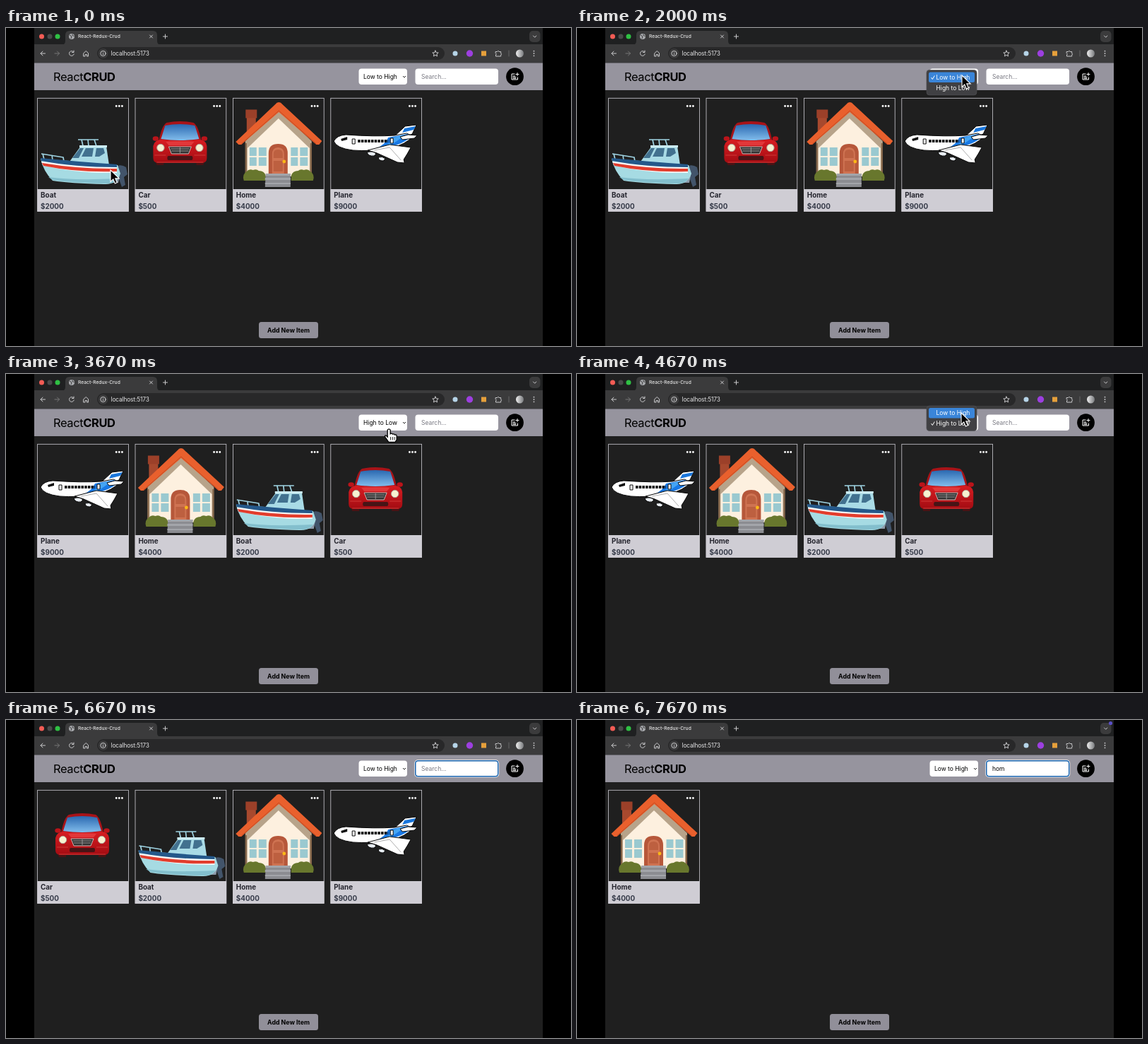
An HTML page that plays this animation: 800 px wide and 450 px high, repeating every 8000 ms.

```html
<!DOCTYPE html>
<html lang="en">
<head>
<meta charset="utf-8">
<title>Item list</title>
<style>
html, body { margin: 0; width: 100%; height: 100%; overflow: hidden; background: #000; }
svg { display: block; width: 800px; height: 450px; font-family: Inter, Roboto, sans-serif; }
.line { fill: none; stroke: #c9c9cb; stroke-width: 1; stroke-linecap: round; stroke-linejoin: round; }
.ui { font-size: 8.5px; }
.bold { font-size: 9.9px; font-weight: 700; }
</style>
</head>
<body>
<svg viewBox="0 0 800 450">
  <defs>
    <linearGradient id="glass" x2="0" y2="1"><stop stop-color="#2a68b0"/><stop offset="1" stop-color="#82bdec"/></linearGradient>
    <linearGradient id="paint" x2="0" y2="1"><stop stop-color="#d81d22"/><stop offset="1" stop-color="#a30c12"/></linearGradient>
    <linearGradient id="face"><stop stop-color="#f0f0f0"/><stop offset="1" stop-color="#77797c"/></linearGradient>

    <g id="Boat">
      <path d="M155 196q8-4 15 1l2 10-5 4 2 11-5 3-5-14-4-4z" fill="#42546a"/>
      <path d="M155 208h6l-2 11h-8z" fill="#8c9bab"/>
      <g fill="none" stroke="#9fd3e2" stroke-width="1.7" stroke-linejoin="round">
        <path d="M50 178l31 5 1 6M52 178l2 8M65 180l1 7M102 158h29M107 158l2 9M125 158l3 9M116 158l1 9"/>
      </g>
      <path d="M90 189l16-22h36l4 27z" fill="#a9dbe6"/>
      <path d="M104 166h39v3h-39z" fill="#cbeaf0"/>
      <path d="M94 184l11-14h5l-7 14zM107 182l6-12h11l-2 12zM126 182l2-12h10l2 7-8 5z" fill="#42718f"/>
      <path d="M49 185q40 3 69 5l40 4 4 12q-5 16-23 15-48-1-73-5-13-13-17-31z" fill="#a6dbe3"/>
      <path d="M50 189l107 8v8q-60 1-105-11z" fill="#f5f7f7"/>
      <path d="M49 184q50 5 108 9v4q-60 0-107-9z" fill="#24588a"/>
      <path d="M51 191q55 9 106 8v4q-55 2-104-8z" fill="#e23d2d"/>
      <path d="M60 211q35 5 98 2-5 8-18 7-48-1-74-5z" fill="#83bfcd"/>
    </g>

    <g id="Car">
      <path d="M72 184h13v10H75zM131 184h13l-3 10h-10z" fill="#4b1214"/>
      <ellipse cx="73.500" cy="156.500" rx="4.200" ry="3.200" fill="#bb141a"/>
      <ellipse cx="142.500" cy="156.500" rx="4.200" ry="3.200" fill="#bb141a"/>
      <path d="M78 160q4-22 11-26 19-4 38 0 7 4 11 26z" fill="#a81318"/>
      <path d="M81 157l6-19q21-4 42 0l6 19q-27 4-54 0z" fill="url(#glass)"/>
      <path d="M70 167q2-9 12-9 26 3 52 0 11 0 12 9v17q0 7-7 7H77q-7 0-7-7z" fill="url(#paint)"/>
      <path d="M88 161q20-2 40 0l-4 5H92z" fill="#e2383a"/>
      <g fill="#f7f1d0" stroke="#a9a49a"><circle cx="80.500" cy="169.500" r="5.200"/><circle cx="135.500" cy="169.500" r="5.200"/></g>
      <path d="M92 168h32l-4 10H96z" fill="#333" stroke="#c7b9b5"/>
      <path d="M95 171h26M96 174h24M108 169v8" stroke="#aaa" stroke-width=".8"/>
      <rect x="90" y="181" width="36" height="6" rx="2" fill="#471416"/>
      <path d="M72 180h16M128 180h16M75 190h66" stroke="#d5453f" stroke-width=".8"/>
    </g>

    <g id="Home">
      <path d="M64 125h13v30H64z" fill="#a8492e"/><path d="M62.500 115.500h16v12h-16z" fill="#9c4029"/>
      <path d="M62 160l47-44 47 44v50H62z" fill="#b7a38a"/>
      <path d="M65 170l44-42 44 42v40H65z" fill="#fdf0df"/>
      <path d="M62 163h2v46h-2zM154 163h2v46h-2z" fill="#826144"/>
      <path d="M109.500 105q3 0 5 3l56 52-4 5h-4l-53-46-53 46h-4l-4-4 56-53q2-3 5-3z" fill="#e9602d"/>
      <path d="M56.500 164l53-47 53 47" fill="none" stroke="#c44a22"/>
      <g fill="#9ac9d0">
        <path id="panes" d="M68 169h10v12H68zM81 169h11v12H81zM68 183h10v12H68zM81 183h11v12H81z"/>
        <use href="#panes" x="58.500"/>
      </g>
      <path d="M95 207v-30q0-13 13.500-13t13.500 13v30z" fill="#b6573a"/>
      <path d="M100 207v-28q0-10 8.500-10t8.500 10v28z" fill="#cf7352"/>
      <path d="M102 184v-6q0-6 6.500-6t6.500 6v6zM102 188h13v15h-13z" fill="#bd6040"/>
      <circle cx="117" cy="189" r="2.400" fill="#fbb817"/>
      <path id="bush" d="M60 216q-3-9 4-13 3-4 9-2 5-2 8 1 8 0 10 7v7z" fill="#68772d"/>
      <use href="#bush" transform="matrix(-1 0 0 1 218 0)"/>
      <path d="M91 206h35v19H90z" fill="#8b8c91"/>
      <path d="M91 206h35v3H91zM90 212h36v3H90zM90 219h36v2H90z" fill="#a3a5aa"/>
    </g>

    <g id="Plane" stroke="#080808" stroke-linejoin="round">
      <path d="M136 152l14-13 16-2-6 13-10 4z" fill="#fff"/>
      <path d="M149 142l16-3-3 5-16 4z" fill="#1976dc" stroke="none"/>
      <path d="M49 160q4-8 17-9 42 3 69 1l17-3 9 4q-10 12-32 17-28 5-53 3-24-3-27-13z" fill="#fff"/>
      <path d="M108 171q14-6 18-16l27-5 6 3q-14 15-51 18z" fill="#1979e5" stroke="none"/>
      <path d="M118 169q11-5 15-14l15-4q-9 12-30 18z" fill="#45a5f4" stroke="none"/>
      <path d="M143 154l11-3 13 1-4 4-17 2z" fill="#fff"/>
      <path d="M97 173l31-8 30 4-5 9-5 8 1 5-10-1-29-13z" fill="#fff"/>
      <path d="M106 173l22-4 16 18" fill="none" stroke="#999" stroke-width=".8"/>
      <path d="M96 176q8-3 13 2l-3 3q-8 1-10-5zM112 183q6-2 10 2l-3 3q-7 0-7-5z" fill="#e8edf2"/>
      <path d="M59 157l9-3v4l-8 2z" fill="#111" stroke="none"/>
      <path d="M75 157h4v7h-4zM129 156h4v7h-4z" fill="#fff"/>
      <path d="M83 160h43" stroke="#111" stroke-width="4" stroke-dasharray="3.5 1.2"/>
    </g>
  </defs>

  <rect x="40" width="720" height="450" fill="#1f1f1f"/>
  <rect x="40" width="720" height="24" fill="#1f2021"/>
  <rect x="40" y="23" width="720" height="27" fill="#3b3b3c"/>
  <path d="M78 24q6 0 6-6V10q0-6 6-6h118q6 0 6 6v8q0 6 6 6z" fill="#3b3b3c"/>
  <circle cx="50.500" cy="12" r="3.500" fill="#f45c55"/>
  <circle cx="62" cy="12" r="3.500" fill="#4a4a4b"/>
  <circle cx="73" cy="12" r="3.500" fill="#2fc044"/>
  <circle cx="93" cy="12" r="4" fill="#a9abae"/>
  <path d="M90 10l3 2-1 3M94 8.500v2l2.500 1" fill="none" stroke="#3b3b3c"/>
  <text x="102" y="14.400" font-size="6.700" font-weight="500" fill="#e6e6e6">React-Redux-Crud</text>
  <rect x="741" y="4" width="15.500" height="16" rx="5" fill="#3b3b3c"/>
  <rect x="129" y="27" width="492" height="18" rx="9" fill="#282829"/>
  <circle cx="137.500" cy="36" r="7" fill="#3b3b3c"/>
  <g class="line">
    <path d="M203.500 10l4 4m0-4l-4 4M222.500 12h6m-3-3v6M746.500 11l2.200 2.200 2.200-2.200"/>
    <path d="M55.500 36h-6.500m3-3l-3 3 3 3"/>
    <path d="M69 36h6.500m-3-3l3 3-3 3" stroke="#777"/>
    <path d="M95.700 34a3.400 3.400 0 1 0 .5 3M96 32v2.500h-2.500M110 35.500l3.300-3 3.200 3V40h-2v-2.500h-2.400V40h-2.100z"/>
    <circle cx="137.500" cy="36" r="3.600"/><path d="M137.500 36v1.700m0-3.500v.1"/>
    <path d="M608 32l1.200 2.700 3 .3-2.300 2 .7 2.900-2.600-1.500-2.600 1.500.7-2.900-2.300-2 3-.3z"/>
    <path d="M693.500 33.500h2.300q1-2.500 2.400 0h2.500v2.400q2 1 0 2.200V40h-7.200v-2q2-1 0-2.200z"/>
    <path d="M712 32v8" stroke="#666"/>
  </g>
  <text x="148.500" y="39" font-size="8.400" letter-spacing="-.15" fill="#e4e4e5">localhost:5173</text>
  <circle cx="636" cy="36" r="3.500" fill="#b6d4e8"/>
  <circle cx="656.500" cy="36" r="4.700" fill="#9d3fe0"/>
  <rect x="673" y="32.500" width="7" height="7" fill="#e6a03b"/>
  <circle cx="727.500" cy="36" r="5.500" fill="url(#face)"/>
  <g fill="#c9c9cb"><circle cx="747.500" cy="32.700" r=".9"/><circle cx="747.500" cy="36" r=".9"/><circle cx="747.500" cy="39.300" r=".9"/></g>

  <rect x="40" y="49.500" width="720" height="38.500" fill="#96949e"/>
  <text x="67" y="75" font-size="16.500" letter-spacing="-.41">React<tspan font-weight="700">CRUD</tspan></text>
  <circle cx="720.500" cy="68.700" r="12.400"/>
  <path class="line" style="stroke:#fff" d="M720 65h-4v8h8.500v-3M718 68h2.500M718 69.700h4M718 71.400h4M724 63.500v4m-2-2h4"/>
  <rect x="358" y="416" width="84" height="23" rx="3.500" fill="#918f99"/>
  <text x="400" y="431" text-anchor="middle" font-size="8.800" font-weight="700">Add New Item</text>
  <g id="live"></g>
</svg>
<script>
const LOOP = 8000, STEP = 1000 / 6;
const LOW = 'Low to High', HIGH = 'High to Low';
const price = { Boat: 2000, Car: 500, Home: 4000, Plane: 9000 };
const live = document.getElementById('live');

// time, x, y of the pointer tip
const path = [
  [0, 148, 201], [1167, 545, 67], [2167, 545, 67], [2500, 541, 83], [3333, 541, 83], [4167, 545, 69],
  [4333, 545, 69], [4667, 544, 55], [5000, 544, 55], [5333, 563, 64], [5833, 640, 68], [LOOP, 640, 68]
];

const text = (x, y, s, cls, fill) => `<text x="${x}" y="${y}" class="${cls}" fill="${fill}">${s}</text>`;
const box = (x, y, w, h, r, attrs) => `<rect x="${x}" y="${y}" width="${w}" height="${h}" rx="${r}" ${attrs}/>`;

function pointerAt(t) {
  const i = path.findIndex(k => k[0] > t);
  const [t0, x0, y0] = path[i - 1], [t1, x1, y1] = path[i];
  const u = (t - t0) / (t1 - t0), e = u * u * (3 - 2 * u);
  return [x0 + (x1 - x0) * e, y0 + (y1 - y0) * e];
}

function itemsAt(t) {
  if (t >= 6830) return ['Home'];
  if (t >= 5160) return ['Car', 'Boat', 'Home', 'Plane'];
  if (t >= 3330) return ['Plane', 'Home', 'Boat', 'Car'];
  return ['Boat', 'Car', 'Home', 'Plane'];
}

const card = (name, i) => `<g transform="translate(${i * 138.4})">
  <use href="#${name}"/>
  ${box(44.3, 228, 129.4, 31.8, 0, 'fill="#cfcdd4"')}
  ${box(44.6, 99.3, 128.8, 160.2, 0, 'fill="none" stroke="#cfcdd4" stroke-width=".8"')}
  ${[156.2, 160.3, 164.4].map(x => `<circle cx="${x}" cy="110.500" r="1.400" fill="#fff"/>`).join('')}
  ${text(49, 240, name, 'bold', '#25252e')}${text(49, 256, '$' + price[name], 'bold', '#353a48')}</g>`;

const field = (x, w, focus, fill = '#fff') => (focus
  ? box(x - 1.2, 56.3, w + 2.4, 24.9, 5, 'fill="#fff"') + box(x - .5, 57, w + 1, 23.5, 4.5, 'fill="#1762ad"') +
    box(x + 1, 58.5, w - 2, 20.5, 3, 'fill="#fff"')
  : box(x, 57.5, w, 22.5, 4, `fill="${fill}"`));

function select(t, fading) {
  const label = t >= 3330 && t < 5160 ? HIGH : LOW;
  return field(499.5, 68.5, t >= 5160 && t < 6330, fading ? '#d6d6d8' : '#fff') +
    (fading ? box(500.5, 58.5, 66.5, 20.5, 4, 'fill="none" stroke="#bbb" stroke-width="2"') : '') +
    text(506, 72, label, 'ui', '#000') +
    '<path d="M562 68l2 2 2-2" fill="none" stroke="#222"/>';
}

// The checked row always lies over the select box.
function menu(checked, hover, opacity) {
  const top = 59.5 - checked * 14.6;
  return `<g opacity="${opacity}" transform="translate(0 ${top})">
    ${box(494.5, -.5, 72, 36.5, 4.5, 'fill="#000" opacity=".25"')}
    ${box(495, 0, 71, 35.5, 4, 'fill="#404043" stroke="#5b5b5e" stroke-width=".5"')}
    ${box(498, 3 + hover * 14.6, 65, 14.6, 2.5, 'fill="#3a85d9"')}
    ${[LOW, HIGH].map((s, i) => text(508.5, 13.5 + i * 14.6, s, 'ui', '#fff')).join('')}
    <path d="M501.500 ${10.5 + checked * 14.6}l1.800 2.500 3-5" fill="none" stroke="#fff"/></g>`;
}

function pointer(t, open) {
  if (t >= 6660) return '';
  const [x, y] = pointerAt(t);
  const inField = (a, b) => x > a && x < b && y > 57 && y < 80;
  let shape = '<path d="M0 0V16.500l3.800-3.500 2.500 6 3-1.300-2.500-5.800h5.400z" fill="#000" stroke="#fff" stroke-width="1.100"/>';
  if (!open && inField(499, 568)) {
    shape = `<g transform="scale(1.1)"><path d="M-2 1q1.800-2.500 3.600 0v5q2-1.300 3 .5 2-.8 2.800.8 2.200-.6 2.400 1.400v5l-2 3H-.5l-4.500-6.500q-1-2.700 1.200-2l1.800 1.800z" fill="#fff" stroke="#000" stroke-width="1.200"/>
      <path d="M2 10v4m2.500-4v4m2.500-4v4" stroke="#000" stroke-width=".8"/></g>`;
  } else if (inField(579, 697)) {
    shape = '<path d="M-2.500-6q2.500 0 2.500 2V5q0 2-2.500 2M2.500-6Q0-6 0-4V5q0 2 2.500 2" fill="none" stroke="#000"/>';
  }
  return `<g transform="translate(${x} ${y})">${shape}</g>`;
}

function search(t) {
  const typed = 'hom'.slice(0, Math.max(0, Math.floor((t - 6660) / STEP)));
  const caret = t >= 6330 && t < 6660 || t >= 6830 && t < 7660;
  const end = 588.5 + [0, 5.3, 10.5, 18][typed.length];
  return field(579.5, 117.5, t >= 6330) +
    text(588, 72, typed || 'Search...', 'ui', typed ? '#000' : '#777780') +
    (caret ? `<path d="M${end} 64v10" stroke="#000" stroke-width=".8"/>` : '');
}

function render(t) {
  const first = t >= 1330 && t < 3160, second = t >= 4330 && t < 4990;
  const fade1 = t >= 3160 && t < 3330, fade2 = t >= 4990 && t < 5160;
  const open = first || second, fading = fade1 || fade2;
  live.innerHTML = itemsAt(t).map(card).join('') +
    (fade1 ? menu(0, 1, .55) : fade2 ? menu(1, 0, .55) : '') +
    select(t, fading) + search(t) +
    (first ? menu(0, t >= 2330 ? 1 : 0, 1) : second ? menu(1, t >= 4500 ? 0 : 1, 1) : '') +
    (t >= 7660 ? '<circle cx="755.500" cy="4.500" r="2.600" fill="#5a4fc6"/>' : '') +
    pointer(t, open || fading);
}

let shown = -1;
function tick() {
  const step = Math.floor((performance.now() % LOOP + 5) / STEP) % 48;
  if (step !== shown) render((shown = step) * STEP);
  requestAnimationFrame(tick);
}
tick();
</script>
</body>
</html>
```
